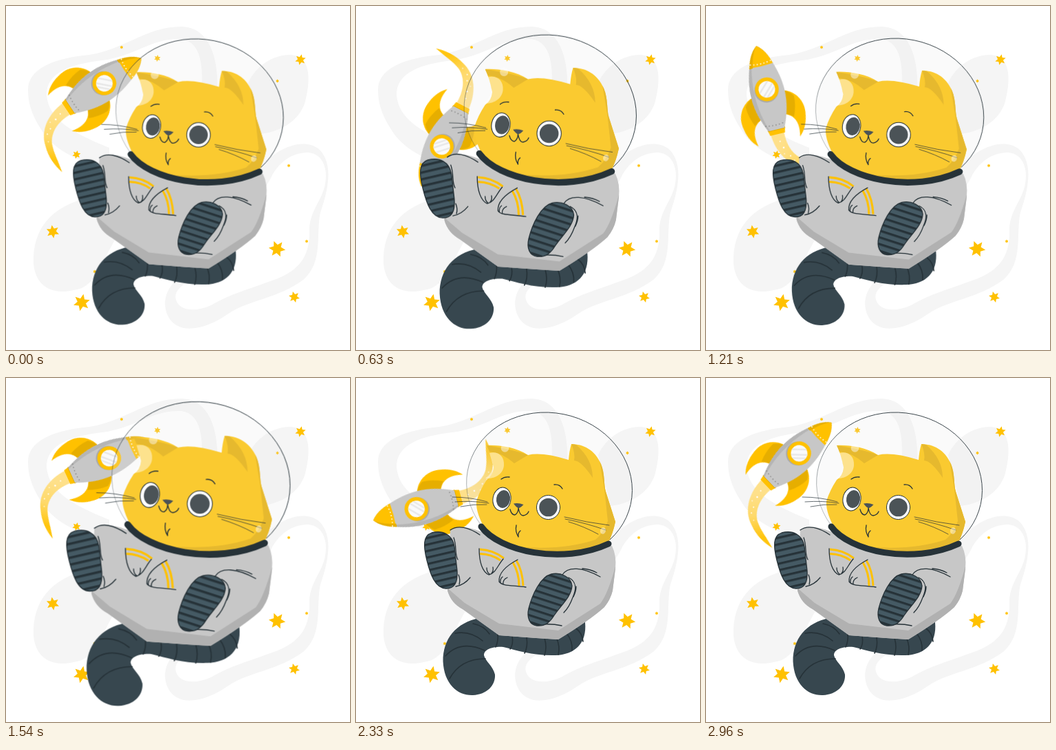
Recreate the animation shown at these times as an HTML page. Size 500 px wide and 500 px high, loop 3000 ms.

```html
<!DOCTYPE html>
<html lang="en">
<head>
<meta charset="utf-8">
<title>Space cat</title>
<style>
  html, body { margin: 0; width: 100%; height: 100%; overflow: hidden; background: #fff; }
  svg { display: block; width: 100vw; height: 100vh; }
  .cat { transform-origin: 250px 256px; animation: beat 3s linear -32ms infinite; }
  .rocket { transform-origin: 122px 156px; animation: spin 1.5s linear infinite; }
  @keyframes beat {
    0%, 30%, 40%, 60%, 100% { transform: scale(1); }
    10%, 50% { transform: scale(1.1); }
  }
  @keyframes spin { to { transform: rotate(360deg); } }
  .gold { fill: #ffc100; }
  .amber { fill: #e6ae00; }
  .navy { fill: #37474f; }
  .line { fill: none; stroke: #263238; stroke-width: 1.3; stroke-linecap: round; stroke-linejoin: round; }
  .hair { stroke-width: .7; }
  .trim { fill: none; stroke: #ffc100; stroke-width: 3; }
  .rivets { fill: none; stroke-linecap: round; stroke-width: 1.8; stroke-dasharray: 0 5; }
</style>
</head>
<body>
<svg viewBox="0 0 500 500">
  <defs>
    <polygon id="star" points="0,-10 2.5,-4.3 8.7,-5 5,0 8.7,5 2.5,4.3 0,10 -2.5,4.3 -8.7,5 -5,0 -8.7,-5 -2.5,-4.3"/>
    <g id="fin">
      <path class="gold" d="M23 7C40 12 51 30 46 50C44 62 38 72 31 78C35 62 33 47 17 41Z"/>
      <path class="amber" d="M23 7C28 9 33 13 36 18Q36 33 29 48Q24 43 17 41Z"/>
    </g>
    <pattern id="tread" width="20" height="9.2" patternUnits="userSpaceOnUse" patternTransform="rotate(-13)">
      <rect width="20" height="9.2" fill="#455a64"/>
      <rect width="20" height="3.2" fill="#263238"/>
    </pattern>
    <pattern id="tread2" width="20" height="9.2" patternUnits="userSpaceOnUse" patternTransform="rotate(18)">
      <rect width="20" height="9.2" fill="#455a64"/>
      <rect width="20" height="3.2" fill="#263238"/>
    </pattern>
    <linearGradient id="fire" gradientUnits="userSpaceOnUse" x1="0" y1="85" x2="52" y2="122">
      <stop offset="0" stop-color="#fee08a"/>
      <stop offset=".5" stop-color="#fed96a"/>
      <stop offset="1" stop-color="#ffc50f"/>
    </linearGradient>
    <linearGradient id="rim" gradientUnits="userSpaceOnUse" x1="160" y1="170" x2="240" y2="120">
      <stop offset="0" stop-color="#263238" stop-opacity=".35"/>
      <stop offset="1" stop-color="#263238"/>
    </linearGradient>
    <clipPath id="hull"><path d="M0 -65C9 -58 14 -48 17 -37C30 0 26 30 12 60H-12C-26 30 -30 0 -17 -37C-14 -48 -9 -58 0 -65Z"/></clipPath>
    <clipPath id="pane"><circle r="12"/></clipPath>
    <path id="head" d="M190 98C205 97 232 100 250 112Q270 107 309 119Q310 106 313 96C330 96 347 104 356 125C362 139 360 155 363 165L377 209Q373 228 366 240C320 262 220 260 186 217C181 207 174 193 175 179Q180 163 190 148Q199 142 200 130Q196 110 190 98Z"/>
    <clipPath id="face"><use href="#head"/></clipPath>
    <path id="suit" d="M137 222C148 213 165 217 181 223L372 244Q379 258 377 277L373 309Q370 322 361 333Q340 352 294 380L262 378L208 374L155 336Q138 327 133 309Z"/>
    <clipPath id="torso"><use href="#suit"/></clipPath>
    <path id="dome" d="M181 213A121 107 12 1 1 369 235"/>
  </defs>

  <g fill="#f5f5f5">
    <path fill-rule="evenodd" d="M32 122C32 92 68 77 112 72C170 67 200 30 255 30C298 31 310 80 307 130L284 130C287 90 285 52 255 48C212 46 190 72 140 79C96 84 58 96 59 130C62 162 90 182 150 206V235C115 231 73 212 54 184C40 163 32 145 32 122Z"/>
    <path d="M352 112C365 82 400 65 424 73C446 83 440 120 434 142C425 166 402 182 370 186Z"/>
    <path d="M40 365C42 318 72 285 135 276L180 300L150 355C130 394 122 410 98 413C60 422 38 400 40 365Z"/>
    <path d="M360 245C388 208 430 189 455 208C477 230 468 268 457 300C450 330 462 372 432 398C396 425 350 428 322 448C290 470 250 480 235 450C226 428 234 410 250 396L266 400C252 408 244 416 247 427C252 443 275 446 300 434C325 419 355 411 395 396C424 384 441 366 441 330C440 300 456 288 463 263C469 240 462 215 440 213C418 212 396 226 385 250L350 310Z"/>
  </g>

  <g class="gold">
    <use href="#star" transform="translate(428 78) rotate(12) scale(.8)"/>
    <use href="#star" transform="translate(394 353) rotate(-23) scale(1.22)"/>
    <use href="#star" transform="translate(419 423) rotate(-15) scale(.82)"/>
    <use href="#star" transform="translate(110 431) rotate(12) scale(1.24)"/>
    <use href="#star" transform="translate(68 328) rotate(-8) scale(.97)"/>
    <use href="#star" transform="translate(102.500 216) rotate(14) scale(.62)"/>
    <use href="#star" transform="translate(220 76) rotate(8) scale(.5)"/>
    <use href="#star" transform="translate(168 60) scale(.27)"/>
    <use href="#star" transform="translate(394.500 109) scale(.27)"/>
    <use href="#star" transform="translate(411 232) scale(.27)"/>
    <use href="#star" transform="translate(437 342) scale(.27)"/>
    <use href="#star" transform="translate(129 386) scale(.28)"/>
  </g>

  <g class="rocket">
    <g transform="translate(142.800 112.300) rotate(55.800)">
      <path fill="url(#fire)" d="M-10 64H10C8 84 14 103 30 112C43 118 58 119 73 123C58 127 42 127 28 122C4 115 -9 92 -10 64Z"/>
      <g fill="#fff">
        <circle cx="1" cy="78" r="1"/><circle cx="4" cy="88" r="1.300"/><circle cx="3" cy="97" r=".8"/>
        <circle cx="11" cy="102" r="1"/><circle cx="15" cy="110" r=".9"/><circle cx="25" cy="115" r=".8"/>
      </g>
      <use href="#fin"/>
      <use href="#fin" transform="scale(-1 1)"/>
      <path class="gold" d="M-13 58H13L11 67H-11Z"/>
      <path class="amber" d="M-13 58H13L12.500 61H-12.500Z"/>
      <g clip-path="url(#hull)">
        <rect x="-30" y="-66" width="60" height="128" fill="#c7c7c7"/>
        <path fill="#b5b5b5" d="M-14 -37C-23 0 -20 32 -9 62H-30V-37Z"/>
        <path class="gold" d="M-30 -66H30V-37Q0 -32 -30 -37Z"/>
        <path class="amber" d="M0 -66Q-10 -52 -13 -34H-30V-66Z"/>
        <path class="rivets" stroke="#fff" d="M-15 -40Q0 -36 16 -40"/>
        <path class="rivets" stroke="#8b8b8b" d="M-14 52Q0 55 15 52"/>
      </g>
      <circle cx="-1" cy="1.500" r="17.500" fill="#a9a9a9"/>
      <circle class="gold" r="17.300"/>
      <circle r="12" fill="#fafafa"/>
      <g clip-path="url(#pane)" stroke="#e8e8e8" stroke-width="2.500">
        <path d="M-12 4L5 -13M-7 10L12 -9M-3 13L14 -4"/>
      </g>
    </g>
  </g>

  <g class="cat">
    <use href="#dome" fill="#e6e6e6" fill-opacity=".2"/>
    <use href="#dome" fill="none" stroke="url(#rim)" stroke-width=".9"/>

    <path class="navy" d="M180 349C145 355 126 380 126.500 412C128 445 148 462 170 461C190 460 203 447 202 431C199 418 188 412 186 403C186 394 200 390 214 391C235 396 258 404 290 403C318 402 336 386 333 355L290 345Z"/>
    <path class="line" style="stroke-width:1.600" d="M144 371Q166 367 184 382M130 404Q152 380 187 396M136 437Q152 408 188 408M170 357Q186 360 194 372M206 371Q207 383 203 391M227 375Q229 387 224 394M248 377Q250 391 245 400M274 378Q278 392 274 403M291 377Q297 390 294 402M306 371Q315 382 314 396M320 364Q329 371 330 383"/>

    <use href="#suit" fill="#c7c7c7"/>
    <path clip-path="url(#torso)" fill="#b1b1b1" d="M130 303L158 327L208 357L294 367L355 328Q366 314 377 274L390 290L360 390H140Z"/>

    <g class="line">
      <path d="M137 221C148 213 164 217 180 228M142 232C147 246 143 255 148 264M145 303Q157 301 166 290M149 286Q152 293 150 300"/>
      <path d="M300 286C308 273 330 275 355 289M329 277Q341 278 350 283M309 290C323 297 319 310 315 319Q310 333 302 341M316 318Q320 310 320 303M270 358Q286 357 299 360"/>
    </g>
    <path class="line" style="fill:url(#tread)" d="M110 225C126 221 140 227 143 245L147 280C148 298 143 306 131 306C115 306 108 285 103 265C98 245 97 229 110 225Z"/>
    <path class="line" style="fill:url(#tread2)" d="M284 285C297 282 313 289 314 302C313 318 298 330 288 345C282 355 275 361 263 360C252 359 248 348 251 335C256 315 268 289 284 285Z"/>

    <path class="trim" d="M180 249Q200 250 215 262M180 255.500Q197 256 210 265M233 265Q242 280 243 302M228 268Q237 283 237 302"/>
    <path class="line" d="M179 248C179 268 184 282 193 286C203 284 206 272 214 263M190 276Q190 282 194 285M199 275Q200 281 197 284"/>
    <path class="line" d="M235 264C218 273 207 283 208 296C213 303 228 301 247 304M213 289Q209 292 210 298M220 290Q213 293 214 300"/>

    <use href="#head" fill="#faca30"/>
    <g clip-path="url(#face)" fill="#e6b92e">
      <path d="M190 98C214 102 235 106 250 112L230 124Q212 108 193 107Z"/>
      <path d="M313 96Q319 110 317 120Q327 120 344 145Q344 118 320 97Z"/>
      <path d="M354 120L361 162L366 208Q360 225 348 235Q300 251 235 245L250 270H390V120Z"/>
    </g>

    <path class="line" style="stroke-width:9" d="M182 216C208 252 300 272 367 241"/>

    <g stroke="#263238" stroke-width="1" fill="#fff">
      <ellipse cx="212" cy="176" rx="13" ry="17" transform="rotate(10 212 176)"/>
      <ellipse cx="279.500" cy="188" rx="17" ry="17.500"/>
    </g>
    <g fill="#4b5357">
      <ellipse cx="214" cy="176" rx="10" ry="13" transform="rotate(10 214 176)"/>
      <circle cx="279.500" cy="188" r="13.300"/>
      <path d="M229 182.500Q236 181 243.500 184Q239 189 236 189Q233 188 229 182.500Z"/>
    </g>
    <path class="line" d="M211 147Q216 143 223 144M288 155Q296 154 300 161M224 191Q226 199 231 199Q236 196 236 189Q238 200 243 200Q249 199 251 194M233 214Q231 223 236 231Q235 225 239 222"/>
    <path class="line hair" d="M140 173Q166 173 191 180M144 180Q170 178 193 182M152 187Q171 183 190 184M303 202Q335 210 368 214M304 205Q335 211 363 221M309 209Q332 216 352 227"/>

    <g fill="#fff" fill-opacity=".45">
      <path d="M194 109C207 106 216 114 215 127C214 139 203 147 188 146Q199 138 199 126Z"/>
      <circle cx="216.500" cy="102" r="5.800"/>
      <ellipse cx="359" cy="222" rx="4" ry="4.800" transform="rotate(20 359 222)"/>
    </g>
  </g>
</svg>
</body>
</html>
```
